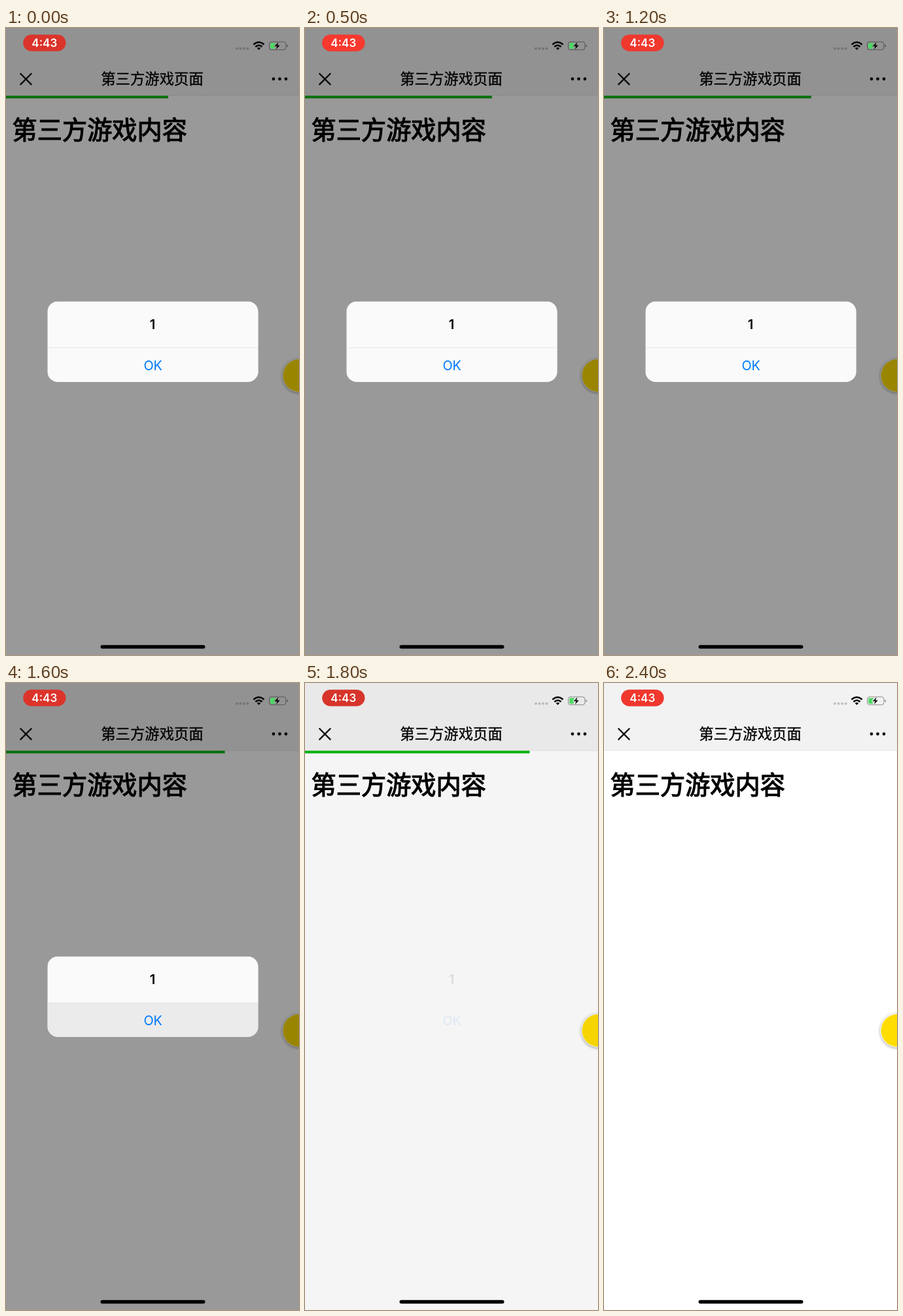
Recreate the animation shown at these times as an HTML page. Size 448 px wide and 960 px high, loop 2.5 s.

```html
<!DOCTYPE html>
<html lang="zh-CN">
<head>
<meta charset="utf-8">
<title>第三方游戏页面</title>
<style>
  html, body { margin: 0; width: 100%; height: 100%; overflow: hidden; background: #fff; }
  svg { display: block; width: 100vw; height: 100vh; }
  text { font-family: Inter, "Noto Sans", sans-serif; text-anchor: middle; }
  .cjk { font-family: "Noto Sans CJK SC", "Noto Sans CJK", sans-serif; stroke: #000; }
  .title { font-size: 22.4px; stroke-width: .3px; }
  .heading { font-size: 38.2px; stroke-width: 1.2px; text-anchor: start; }
  .clock { font-size: 17px; font-weight: 600; fill: #fff; }
  .message { font-size: 20.3px; font-weight: 600; }
  .ok { font-size: 20px; letter-spacing: -.3px; fill: #007aff; }
  .badge { filter: drop-shadow(0 1px 2px rgba(0, 0, 0, .4)); }

  /* Every change lands on a 100 ms tick (4% of the loop). */
  .bar, .dim, .panel, .label, .press, .glow { animation: 2.5s step-end infinite; }
  .bar { animation-name: load; }
  .dim { animation-name: dim; }
  .panel { animation-name: panel; }
  .label { animation-name: label; }
  .press { animation-name: press; }
  .glow { animation-name: pulse; animation-timing-function: steps(2); }

  @keyframes load {
    0% { width: 248px; opacity: 1; }
    4% { width: 264px; }
    8% { width: 272px; }
    12% { width: 277px; animation-timing-function: steps(15); }
    72% { width: 343.5px; }
    76% { width: 366px; }
    80% { width: 420px; }
    84% { width: 448px; opacity: 1; }
    88% { width: 448px; opacity: .5; }
    92%, 100% { width: 448px; opacity: 0; }
  }
  @keyframes dim {
    0% { opacity: .4; }
    68% { opacity: .208; }
    72% { opacity: .04; }
    76%, 100% { opacity: 0; }
  }
  @keyframes panel {
    0% { opacity: 1; }
    68% { opacity: .73; }
    72% { opacity: .05; }
    76%, 100% { opacity: 0; }
  }
  @keyframes label {
    0% { opacity: 1; }
    68% { opacity: .52; }
    72% { opacity: .1; }
    76%, 100% { opacity: 0; }
  }
  @keyframes press {
    0% { opacity: 0; }
    60% { opacity: 1; }
    68%, 100% { opacity: 0; }
  }
  /* Two-second cosine pulse, brightest at 800 ms. */
  @keyframes pulse {
    0% { opacity: .1; animation-timing-function: steps(3); }
    12% { opacity: .5; }
    20% { opacity: .8; animation-timing-function: steps(3); }
    32% { opacity: 1; animation-timing-function: steps(3); }
    44% { opacity: .8; }
    52% { opacity: .5; }
    60% { opacity: .2; animation-timing-function: steps(3); }
    72% { opacity: 0; animation-timing-function: steps(3); }
    84% { opacity: .2; }
    92% { opacity: .5; }
    100% { opacity: .8; }
  }
</style>
</head>
<body>
<svg viewBox="0 0 448 960" preserveAspectRatio="none">
  <defs>
    <clipPath id="card"><rect x="63.3" y="418.6" width="322.4" height="123.4" rx="16"/></clipPath>
  </defs>

  <!-- Page -->
  <rect width="448" height="960" fill="#fff"/>
  <rect width="448" height="104" fill="#f2f2f2"/>
  <rect y="103" width="448" height="1" fill="#e8e8e8"/>
  <path d="M22.3 70L38.6 86.3M38.6 70L22.3 86.3" stroke="#111" stroke-width="2.4" stroke-linecap="round"/>
  <text class="cjk title" x="223.5" y="86.4">第三方游戏页面</text>
  <g fill="#111">
    <circle cx="409" cy="78" r="2.4"/>
    <circle cx="418.5" cy="78" r="2.4"/>
    <circle cx="428" cy="78" r="2.4"/>
  </g>
  <rect class="bar" y="103.7" height="4" fill="#0bb810"/>
  <text class="cjk heading" x="9.6" y="169.8">第三方游戏内容</text>
  <g class="badge">
    <circle cx="448.5" cy="532" r="26" fill="#fff"/>
    <circle cx="448.5" cy="532" r="25" fill="#ffdd00"/>
  </g>

  <rect class="dim" width="448" height="960" fill="#000"/>

  <!-- Alert -->
  <g clip-path="url(#card)">
    <g class="panel">
      <rect x="63" y="418" width="323" height="125" fill="#fafafa"/>
      <rect class="press" x="63" y="489" width="323" height="54" fill="#ebebeb"/>
      <rect x="63" y="489" width="323" height="1" fill="#e8e8e8"/>
    </g>
    <g class="label">
      <text class="message" x="224" y="461">1</text>
      <text class="ok" x="224.5" y="523.6">OK</text>
    </g>
  </g>

  <!-- Status bar -->
  <rect x="26.2" y="10.2" width="65.3" height="25.2" rx="12.6" fill="#d7342b"/>
  <rect class="glow" x="26.2" y="10.2" width="65.3" height="25.2" rx="12.6" fill="#ff3b30"/>
  <text class="clock" x="58.8" y="29">4:43</text>
  <g fill="#000" fill-opacity=".2">
    <circle cx="353" cy="31.6" r="2"/>
    <circle cx="358.5" cy="31.6" r="2"/>
    <circle cx="364" cy="31.6" r="2"/>
    <circle cx="369.5" cy="31.6" r="2"/>
  </g>
  <g fill="none" stroke="#000" stroke-width="2.5">
    <path d="M378.4 25.4Q386.5 18.2 394.6 25.4"/>
    <path d="M381.4 28.7Q386.5 24.2 391.6 28.7"/>
  </g>
  <path d="M386.5 33.8L383.7 30.8Q386.5 28.6 389.3 30.8Z"/>
  <rect x="402.5" y="21.2" width="25.4" height="12.2" rx="3.4" fill="none" stroke="#000" stroke-opacity=".42"/>
  <path d="M429.4 25.2Q431.2 26 431.2 27.3T429.4 29.4Z" fill-opacity=".42"/>
  <path d="M406 22.9H412.6L409 28.6H411.4L410.8 31.7H406Q404.2 31.7 404.2 29.9V24.7Q404.2 22.9 406 22.9Z" fill="#4cd964"/>
  <path d="M416.4 21.8L410.8 28H414.4L413 32.8L418.8 26.4H415.2Z"/>

  <!-- Home indicator -->
  <rect x="144.5" y="944.7" width="160" height="5.6" rx="2.8"/>
</svg>
</body>
</html>
```
